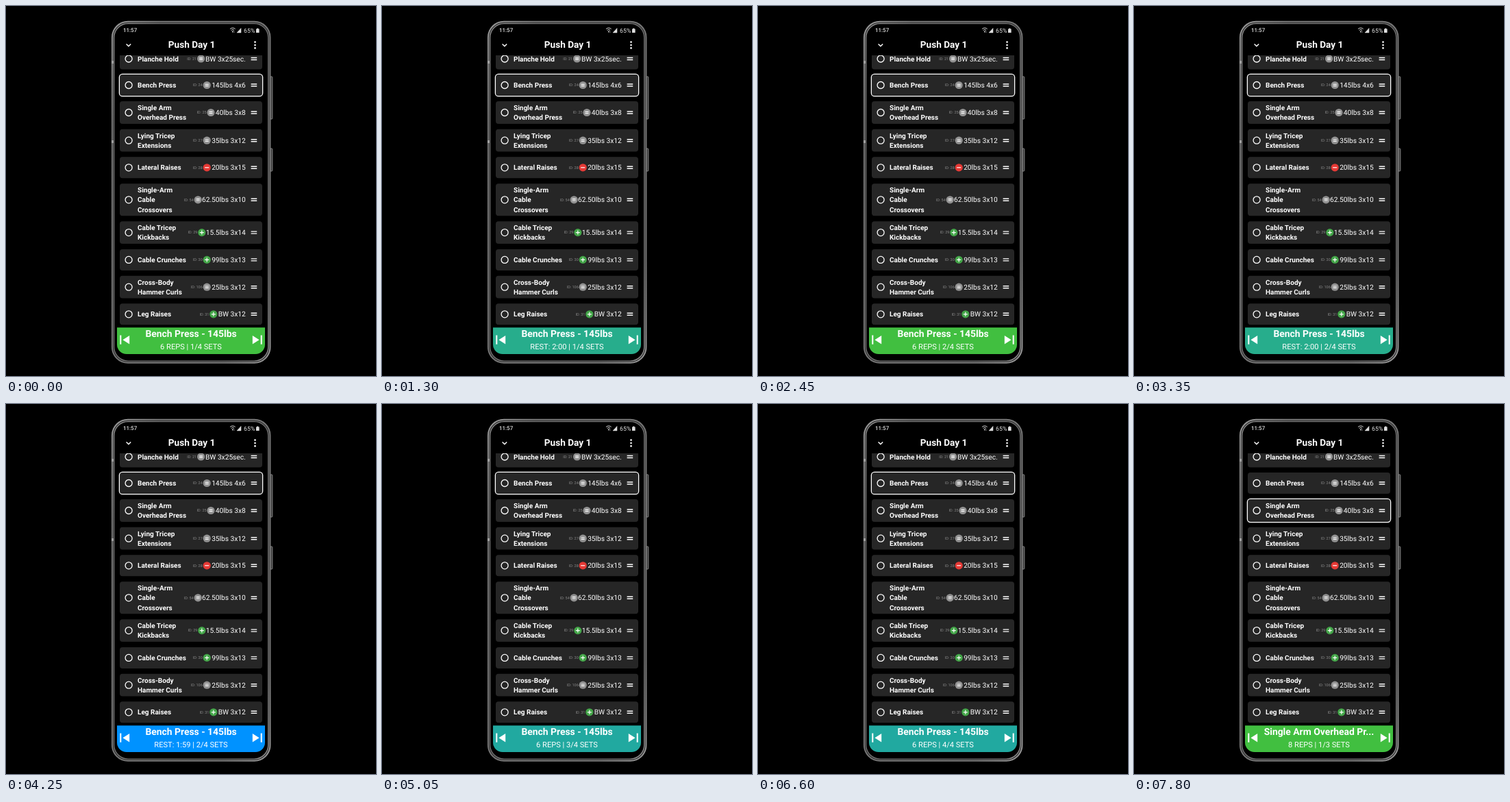
An HTML page that plays this animation: 540 by 540 pixels, repeating every 8 s.

```html
<!DOCTYPE html>
<html lang="en">
<head>
<meta charset="utf-8">
<title>Workout player</title>
<style>
  html, body { margin: 0; width: 100%; height: 100%; overflow: hidden; background: #000; }
  svg { display: block; width: 540px; height: 540px; font-family: Roboto, sans-serif; fill: #fff; text-rendering: geometricPrecision; }
  .label { font-size: 10px; font-weight: 600; }
  .value { font-size: 10.2px; text-anchor: end; }
  .id { font-size: 5.5px; text-anchor: end; fill: #8a8a8a; }
  .title { font-size: 13.9px; font-weight: 700; text-anchor: middle; }
  .sub { font-size: 11.1px; text-anchor: middle; }
  .line { fill: none; stroke: #fff; }
</style>
</head>
<body>
<svg viewBox="0 0 540 540">
  <defs>
    <linearGradient id="metal" x1="0" y1="0" x2="1" y2="1">
      <stop offset="0" stop-color="#9a9a9a"/>
      <stop offset=".15" stop-color="#767676"/>
      <stop offset=".85" stop-color="#767676"/>
      <stop offset="1" stop-color="#9a9a9a"/>
    </linearGradient>
    <clipPath id="view"><rect x="162" y="72" width="216" height="397"/></clipPath>
  </defs>
  <rect width="540" height="540" fill="#000"/>

  <g id="phone">
    <path d="M386 103h1.6q1.2 0 1.2 1.2v59.6q0 1.2-1.2 1.2H386zM386 208h1.6q1.2 0 1.2 1.2v30.6q0 1.2-1.2 1.2H386z" fill="#333" stroke="#999" stroke-width=".9"/>
    <rect x="154.9" y="22.8" width="230.6" height="498" rx="23" fill="#333" stroke="url(#metal)" stroke-width="1.9"/>
    <rect x="157.7" y="25.6" width="225" height="492.4" rx="20.5" fill="#000" stroke="url(#metal)" stroke-width="1.2"/>
    <path d="M154 80h2.6v4H154zM154 196h2.6v4H154z" fill="#aaa"/>
  </g>

  <g id="status" fill="#ddd">
    <text x="170.9" y="38.4" font-size="8" font-weight="500">11:57</text>
    <text x="347" y="38.7" font-size="8.8">65%</text>
    <path d="M327 33.5a5.6 5.6 0 0 1 7.6 0M328.6 35.4a3.4 3.4 0 0 1 4.4 0" fill="none" stroke="#ddd"/>
    <circle cx="330.8" cy="37.4" r="1"/>
    <path d="M333 36.6v2.4M337 39h6v-6.6z" stroke="#ddd" stroke-width=".5"/>
    <path d="M365 33.6h1.3v-1.2h2v1.2h1.3v5.4h-4.6z"/>
  </g>

  <path class="line" d="M175.6 55.4l3.3 3.3 3.3-3.3" stroke-width="1.4"/>
  <text class="title" x="271" y="61.4" style="font-size:13.6px">Push Day 1</text>
  <circle cx="363.5" cy="52.6" r="1.3"/>
  <circle cx="363.5" cy="57" r="1.3"/>
  <circle cx="363.5" cy="61.4" r="1.3"/>

  <g id="list" clip-path="url(#view)"></g>

  <path id="bar" d="M162 469.3H378V494a14 14 0 0 1-14 14H176a14 14 0 0 1-14-14z"/>
  <path d="M166.3 480.6h2v13.2h-2zM180.2 480.9v12.6l-9.8-6.3z"/>
  <path d="M371.7 480.6h2v13.2h-2zM359.8 480.9v12.6l9.8-6.3z"/>
  <text class="title" id="name" x="270" y="483.4"></text>
  <text class="sub" id="detail" x="270" y="501"></text>
</svg>

<script>
const LOOP = 8000, STEP = 50, FADE = 250;
const GREEN = [65, 191, 64], BLUE = [0, 146, 255];
const $ = id => document.getElementById(id);

// centre y, label lines, id, badge, badge x, value
const rows = [
  [77, "Planche Hold", 21, "=", 284.6, "BW 3x25sec."],
  [115.5, "Bench Press", 24, "=", 293.2, "145lbs 4x6"],
  [155.5, "Single Arm|Overhead Press", 25, "=", 299, "40lbs 3x8"],
  [196.2, "Lying Tricep|Extensions", 27, "=", 293.2, "35lbs 3x12"],
  [235.8, "Lateral Raises", 28, "-", 293.2, "20lbs 3x15"],
  [282.8, "Single-Arm|Cable|Crossovers", 54, "=", 280.2, "62.50lbs 3x10"],
  [330.6, "Cable Tricep|Kickbacks", 29, "+", 285.8, "15.5lbs 3x14"],
  [370.4, "Cable Crunches", 30, "+", 293.2, "99lbs 3x13"],
  [410.2, "Cross-Body|Hammer Curls", 106, "=", 293.2, "25lbs 3x12"],
  [449.8, "Leg Raises", 31, "+", 302.8, "BW 3x12"]
];
const badges = {
  "=": ["#929292", "M-2.5-1.2h5M-2.5 1.2h5"],
  "-": ["#e53935", "M-3 0h6"],
  "+": ["#43a548", "M-3 0h6M0-3v6"]
};
const heights = [0, 31, 32.8, 47];

function rowMarkup([y, label, id, badge, x, value]) {
  const lines = label.split("|"), h = heights[lines.length];
  const [color, sign] = badges[badge];
  const text = lines.map((s, i) =>
    `<text class="label" x="192" y="${y + 3.6 + (i - (lines.length - 1) / 2) * 14.2}">${s}</text>`).join("");
  return `<rect x="166" y="${y - h / 2}" width="208" height="${h}" rx="4" fill="#262626"/>
    <circle class="line" cx="179.1" cy="${y}" r="5" stroke-width="1.3"/>${text}
    <text class="id" x="${x - 6.4}" y="${y + 1.8}">ID: ${id}</text>
    <g transform="translate(${x} ${y})"><circle r="5.6" fill="${color}"/>
      <path class="line" d="${sign}" stroke-width="1.2"/></g>
    <text class="value" x="349.8" y="${y + 3.6}">${value}</text>
    <path class="line" d="M357.6 ${y - 1.5}h8.6M357.6 ${y + 1.5}h8.6" stroke-width="1.4"/>`;
}
$("list").innerHTML = rows.map(rowMarkup).join("") +
  '<rect id="focus" class="line" x="165.4" width="209.2" rx="4.5" stroke-width="1.3"/>';

// start time, selected row, resting, set progress
const phases = [
  [0, 1, false, "1/4"],
  [1200, 1, true, "1/4"],
  [2175, 1, false, "2/4"],
  [3250, 1, true, "2/4"],
  [4925, 1, false, "3/4"],
  [5600, 1, true, "3/4"],
  [6475, 1, false, "4/4"],
  [7800, 2, false, "1/3"]
];
const work = { 1: ["Bench Press - 145lbs", 6], 2: ["Single Arm Overhead Pr...", 8] };
const tone = phase => phase[2] ? BLUE : GREEN;

function draw(now) {
  const t = Math.floor(now % LOOP / STEP) * STEP;
  const i = phases.findLastIndex(p => p[0] <= t);
  const phase = phases[i], [start, row, resting, sets] = phase;
  const from = tone(phases[i - 1] || phase), to = tone(phase);
  const k = Math.min(1, (t - start) / FADE);
  $("bar").setAttribute("fill", `rgb(${from.map((c, n) => Math.round(c + (to[n] - c) * k))})`);

  const [name, reps] = work[row];
  const clock = t - start < 1000 ? "2:00" : "1:59";
  $("name").textContent = name;
  $("detail").textContent = (resting ? `REST: ${clock}` : `${reps} REPS`) + ` | ${sets} SETS`;

  const [y, label] = rows[row], h = heights[label.split("|").length] + 1.4;
  $("focus").setAttribute("y", y - h / 2);
  $("focus").setAttribute("height", h);
}

const origin = performance.now();
function tick() {
  draw(performance.now() - origin);
  requestAnimationFrame(tick);
}
tick();
</script>
</body>
</html>
```
